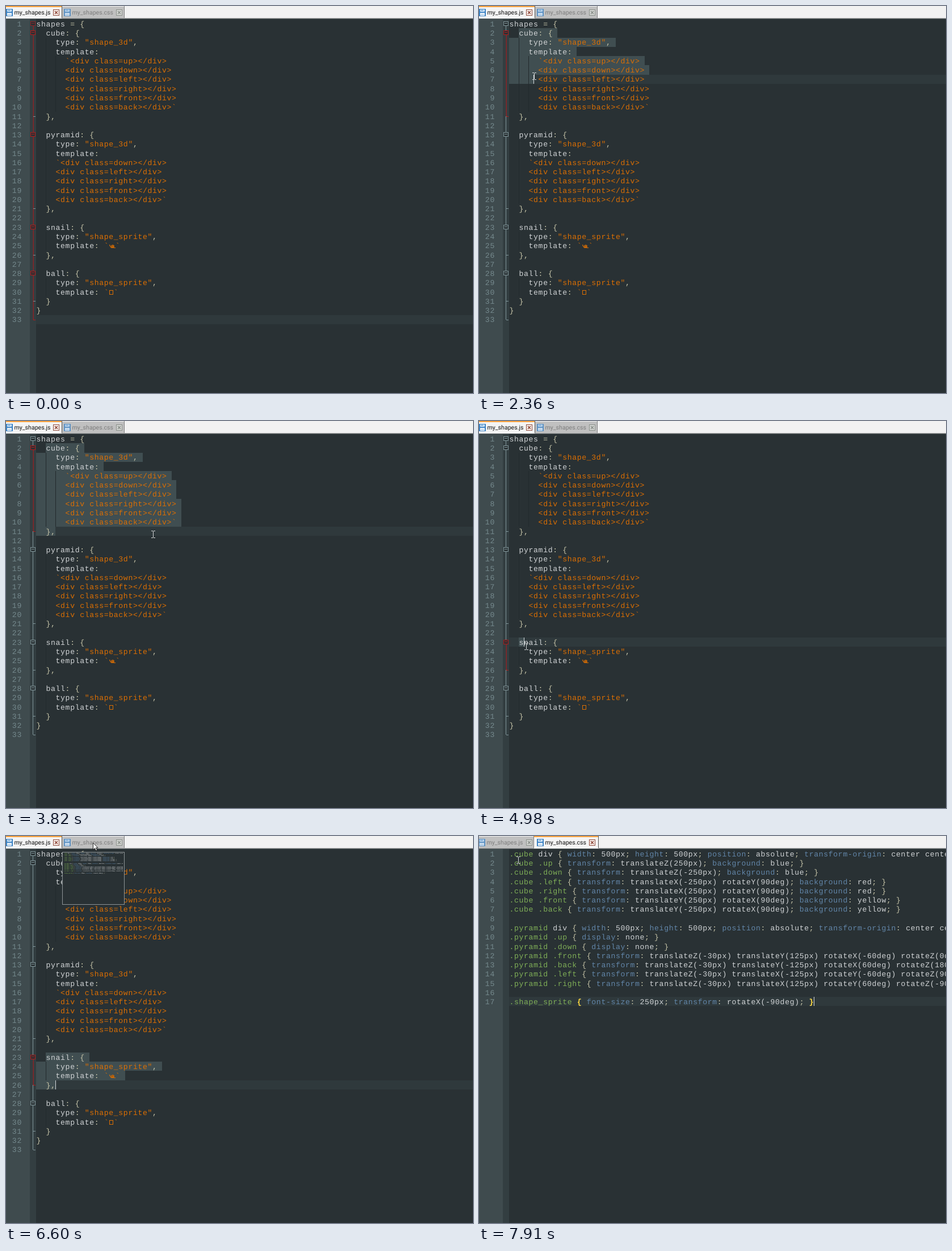
An HTML page with a canvas for the animation above (7990 ms loop, 823 px wide and 681 px high).

```html
<!DOCTYPE html>
<html lang="en">
<head>
<meta charset="utf-8">
<title>Shape editor</title>
<style>
  html, body { margin: 0; width: 100%; height: 100%; overflow: hidden; background: #293134; }
  canvas { display: block; }
</style>
</head>
<body>
<canvas id="stage" width="823" height="681"></canvas>
<script>
const ctx = document.getElementById('stage').getContext('2d');
const W = 823, H = 681, LOOP = 7990;
const X0 = 53.2, CW = 8.52, TOP = 23.5, LH = 16.27;
const MONO = '13.2px "Liberation Mono", "Courier New", monospace';
const UI = '10.6px Roboto, "Open Sans", sans-serif';
const C = {
  bg: '#293134', gutter: '#3f4b4e', fold: '#333e41', current: '#2f393c', select: '#404e51',
  text: '#d0d3d5', op: '#c6c4a8', string: '#dc6f03', number: '#75898d', line: '#81969a',
  selector: '#7fae57', prop: '#6286a9', brace: '#f8d437', red: '#b01c1c', redLine: '#8a2427',
  guide: '#222a2d'
};

// '@' stands for the snail and '#' for the missing-glyph box
const JS = `shapes = {
  cube: {
    type: "shape_3d",
    template:
      ~<div class=up></div>
      <div class=down></div>
      <div class=left></div>
      <div class=right></div>
      <div class=front></div>
      <div class=back></div>~
  },

  pyramid: {
    type: "shape_3d",
    template:
    ~<div class=down></div>
    <div class=left></div>
    <div class=right></div>
    <div class=front></div>
    <div class=back></div>~
  },

  snail: {
    type: "shape_sprite",
    template: ~@~
  },

  ball: {
    type: "shape_sprite",
    template: ~#~
  }
}
`.replace(/~/g, '`').split('\n');

const size = 'width: 500px; height: 500px; position: absolute; transform-origin: center center;';
const cubeSide = (name, move, color) => `.cube .${name} { transform: ${move}; background: ${color}; }`;
const slope = (name, move) => `.pyramid .${name} { transform: translateZ(-30px) ${move}; }`;
const CSS = [
  `.cube div { ${size} }`,
  cubeSide('up', 'translateZ(250px)', 'blue'),
  cubeSide('down', 'translateZ(-250px)', 'blue'),
  cubeSide('left', 'translateX(-250px) rotateY(90deg)', 'red'),
  cubeSide('right', 'translateX(250px) rotateY(90deg)', 'red'),
  cubeSide('front', 'translateY(250px) rotateX(90deg)', 'yellow'),
  cubeSide('back', 'translateY(-250px) rotateX(90deg)', 'yellow'),
  '',
  `.pyramid div { ${size} }`,
  '.pyramid .up { display: none; }',
  '.pyramid .down { display: none; }',
  slope('front', 'translateY(125px) rotateX(-60deg) rotateZ(0deg)'),
  slope('back', 'translateY(-125px) rotateX(60deg) rotateZ(180deg)'),
  slope('left', 'translateX(-125px) rotateY(-60deg) rotateZ(90deg)'),
  slope('right', 'translateX(125px) rotateY(60deg) rotateZ(-90deg)'),
  '',
  '.shape_sprite { font-size: 250px; transform: rotateX(-90deg); }'
];

const JS_RULES = [[/^("[^"]*"|[`<].*)/, C.string], [/^[{}:,=]/, C.op], [/^\w+|^./, C.text]];
const CSS_RULES = [[/^\.\w+/, C.selector], [/^[a-z-]+(?=:)/, C.prop], [/^[{}:;]/, C.op], [/^[\w-]+|^./, C.text]];

// Folding blocks: first and last line
const BLOCKS = [[2, 11], [13, 21], [23, 26], [28, 31]];

// Pointer path: tick, x, y
const PATH = [
  [0, 689, 674], [10, 88, 133], [15, 66, 58], [17, 70, 51], [19, 70, 51], [20, 122, 53],
  [24, 97, 123], [28, 118, 194], [37, 118, 194], [41, 258, 198], [42, 258, 198], [43, 259, 199],
  [45, 259, 199], [52, 64, 442], [55, 70, 392], [57, 70, 391], [61, 120, 412], [65, 96, 446],
  [69, 96, 446], [79, 153, 12], [87, 153, 12], [96, 69, 42]
];
const BLINKS = [20, 28, 36, 43, 50, 67, 74, 86, 93];

function pointer(k) {
  let i = PATH.findIndex(p => p[0] > k);
  if (i < 0) i = PATH.length - 1;
  const a = PATH[i - 1], b = PATH[i], span = b[0] - a[0];
  let u = Math.min(1, (k - a[0]) / span);
  if (span >= 8) u = u * u * (3 - 2 * u);   // long moves are eased
  return { x: Math.round(a[1] + (b[1] - a[1]) * u), y: Math.round(a[2] + (b[2] - a[2]) * u) };
}

const lineTop = n => Math.floor(TOP + LH * (n - 1));
const baseline = n => Math.round(TOP + LH * (n - 1) + 12.3);

function colX(line, col) {
  const i = line.indexOf('@');
  return X0 + col * CW + (i >= 0 && col > i ? 3 : 0);
}

function rect(color, x, y, w, h) {
  ctx.fillStyle = color;
  ctx.fillRect(x, y, w, h);
}

function frame(color, x, y, w, h) {
  ctx.strokeStyle = color;
  ctx.lineWidth = 1;
  ctx.strokeRect(x + .5, y + .5, w - 1, h - 1);
}

function poly(points) {
  ctx.beginPath();
  points.forEach(([x, y]) => ctx.lineTo(x, y));
}

function snail(x, y) {
  ctx.fillStyle = C.string;
  ctx.beginPath();
  ctx.ellipse(x + 6, y - 3.2, 2.8, 2.5, 0, 0, 7);
  ctx.fill();
  ctx.strokeStyle = C.string;
  ctx.lineWidth = 1.2;
  poly([[x + .5, y - 6], [x + 1.5, y - 3.5], [x + 3.5, y - .8], [x + 11, y - .5]]);
  ctx.stroke();
  ctx.strokeStyle = C.bg;
  ctx.lineWidth = .7;
  ctx.beginPath();
  ctx.arc(x + 6, y - 3, 1.2, 2, 6.5);
  ctx.stroke();
}

function codeLine(line, n, rules) {
  const y = baseline(n);
  let col = 0;
  while (col < line.length) {
    const rest = line.slice(col);
    const [pattern, color] = rules.find(r => r[0].test(rest));
    for (const ch of rest.match(pattern)[0]) {
      const x = colX(line, col++);
      if (x > W) return;
      if (ch === '@') snail(x + 1, y);
      else if (ch === '#') frame(C.string, Math.round(x) + 1, y - 8, 7, 8);
      else if (ch !== ' ') {
        ctx.fillStyle = color;
        ctx.fillText(ch, x + CW / 2, y);
      }
    }
  }
}

function code(lines, rules) {
  ctx.font = MONO;
  ctx.textAlign = 'center';
  lines.forEach((line, i) => codeLine(line, i + 1, rules));
}

function brace(ch, n, col) {
  ctx.font = 'bold ' + MONO;
  ctx.textAlign = 'center';
  ctx.fillStyle = C.brace;
  ctx.fillText(ch, X0 + (col + .5) * CW, baseline(n));
}

function gutter(count) {
  rect(C.gutter, 0, 23, 42, H);
  rect(C.fold, 42, 23, 11, H);
  ctx.font = MONO;
  ctx.fillStyle = C.number;
  ctx.textAlign = 'right';
  for (let n = 1; n <= count; n++) {
    String(n).split('').reverse().forEach((d, i) => ctx.fillText(d, 27.3 - i * CW, baseline(n)));
  }
}

function folds([from, to]) {
  const mid = n => lineTop(n) + 8;
  const outer = from === 1;
  const line = (a, b) => rect(C.line, 47, a, 1, b - a);
  line(mid(1), mid(from));
  line(mid(to), mid(33));
  rect(C.redLine, 47.5, mid(from), 1.5, mid(to) - mid(from));
  rect(outer ? C.red : C.line, 48, mid(33), 4, 1);
  const box = (n, color) => {
    rect(C.bg, 43, mid(n) - 4, 9, 8);
    frame(color, 43, mid(n) - 4, 9, 8);
    rect(color, 45, mid(n) - 1, 5, 1);
  };
  box(1, outer ? C.redLine : C.line);
  for (const [a, b] of BLOCKS) {
    const lit = a >= from && b <= to;
    box(a, lit ? C.red : C.line);
    rect(lit && !outer ? C.red : C.line, 48, mid(b), 4, 1);
  }
}

function guides() {
  for (const [a, b] of BLOCKS) {
    rect(C.guide, 70, lineTop(a + 1), 1, lineTop(b) - lineTop(a + 1));
  }
  rect(C.guide, 87, lineTop(5), 1, lineTop(11) - lineTop(5));
}

function selection(anchor, head) {
  for (let n = anchor.n; n <= head.n; n++) {
    const line = JS[n - 1];
    const a = n === anchor.n ? colX(line, anchor.col) : X0;
    const b = n === head.n ? colX(line, head.col) : colX(line, line.length) + CW;
    rect(C.select, Math.round(a), lineTop(n), Math.round(b) - Math.round(a), lineTop(n + 1) - lineTop(n));
  }
}

function caretAt({ x, y }) {
  const n = Math.floor((y - TOP) / LH) + 1;
  const col = Math.round((x - X0) / CW);
  return { n, col: Math.max(0, Math.min(JS[n - 1].length, col)) };
}

function disk(x, on) {
  ctx.globalAlpha = on ? 1 : .75;
  rect('#3b82c4', x, 5, 12, 13);
  rect('#dcebf8', x + 2, 6, 8, 4);
  rect('#f4f8fc', x + 2, 12, 8, 5);
  rect('#3b82c4', x + 3, 7, 5, 1);
  rect('#8ab4da', x + 3, 14, 6, 1);
  ctx.globalAlpha = 1;
}

function closeBox(x, on) {
  const color = on ? '#8f4a3c' : '#8a908a';
  rect(on ? '#fbf3ef' : '#d2d4d1', x, 6, 11, 11);
  frame(color, x, 6, 11, 11);
  ctx.strokeStyle = color;
  ctx.lineWidth = 1.7;
  ctx.beginPath();
  ctx.moveTo(x + 3, 9); ctx.lineTo(x + 8, 14);
  ctx.moveTo(x + 8, 9); ctx.lineTo(x + 3, 14);
  ctx.stroke();
}

function tab(label, on, x, right, textX, closeX) {
  rect(on ? '#f4f4f4' : '#c0c0c0', x, on ? 0 : 1, right - x, on ? 22 : 20);
  if (on) rect('#f9a340', x, 0, right - x, 2);
  rect(on ? '#555' : '#808080', right, 0, 1, 21);
  disk(Math.round(textX - 14.5), on);
  ctx.font = UI;
  ctx.textAlign = 'left';
  ctx.fillStyle = on ? '#111' : '#7d7d7d';
  ctx.fillText(label, textX, 15);
  closeBox(closeX, on);
}

function tabs(css) {
  rect('#f2f2f2', 0, 0, W, 22);
  rect('#a8a8a8', 0, 21, W, 1);
  rect('#5d6466', 0, 22, W, 1);
  tab('my_shapes.js', !css, 0, css ? 96 : 98, css ? 13.5 : 14.5, 83);
  tab('my_shapes.css', css, css ? 97 : 99, css ? 210 : 208, 116.5, 194);
}

function preview() {
  ctx.save();
  rect(C.bg, 99, 28, 110, 93);
  ctx.beginPath();
  ctx.rect(100, 29, 108, 91);
  ctx.clip();
  ctx.translate(95, 26.3);
  ctx.scale(.134, .134);
  // two passes keep the tiny text bright
  code(CSS, CSS_RULES);
  code(CSS, CSS_RULES);
  ctx.restore();
  frame('#8d9496', 99, 28, 110, 93);
}

function drawPointer({ x, y }) {
  if (y < 22) {
    poly([[0, 0], [0, 12], [3, 9.5], [5, 14], [7, 13], [5, 8.8], [8.5, 8.8]].map(p => [x + p[0] + .5, y + p[1]]));
    ctx.closePath();
    ctx.fillStyle = '#fff';
    ctx.fill();
    ctx.strokeStyle = '#111';
    ctx.lineWidth = .9;
    ctx.stroke();
    return;
  }
  const color = '#d5d8d9';
  rect(color, x, y - 5, 1, 11);
  for (const end of [y - 6, y + 6]) {
    rect(color, x - 3, end, 3, 1);
    rect(color, x + 1, end, 3, 1);
  }
}

function draw(t) {
  const k = Math.floor((t - 510) / 77 + .1);
  const css = k >= 83;
  const lines = css ? CSS : JS;
  let anchor = null, head = { n: 33, col: 0 }, block = [1, 33];
  if (css) {
    head = { n: 17, col: 63 };
  } else if (k >= 57) {
    anchor = { n: 23, col: 2 };
    head = caretAt(pointer(Math.min(k, 65)));
    block = BLOCKS[2];
  } else if (k >= 20) {
    anchor = { n: 2, col: 2 };
    head = caretAt(pointer(Math.min(k, 28)));
    block = BLOCKS[0];
  }

  rect(C.bg, 0, 0, W, H);
  rect(C.current, 53, lineTop(head.n), W, 16);
  if (anchor) selection(anchor, head);
  gutter(lines.length);
  if (!css) {
    guides();
    folds(block);
  }
  code(lines, css ? CSS_RULES : JS_RULES);
  if (css) {
    brace('{', 17, 14);
    brace('}', 17, 62);
  } else if (k >= 20 && head.n === 2 && head.col >= 8) {
    brace('{', 2, 8);
    brace('}', 11, 2);
  }
  if (BLINKS.filter(b => b <= k).length % 2) {
    rect('#d4dadd', Math.round(colX(lines[head.n - 1], head.col)), lineTop(head.n), 1, 16);
  }
  tabs(css);
  if (k >= 79 && !css) preview();
  if (k >= 0) drawPointer(pointer(k));
}

ctx.textRendering = 'geometricPrecision';
const start = performance.now();
function tick() {
  draw((performance.now() - start) % LOOP);
  requestAnimationFrame(tick);
}
tick();
</script>
</body>
</html>
```
